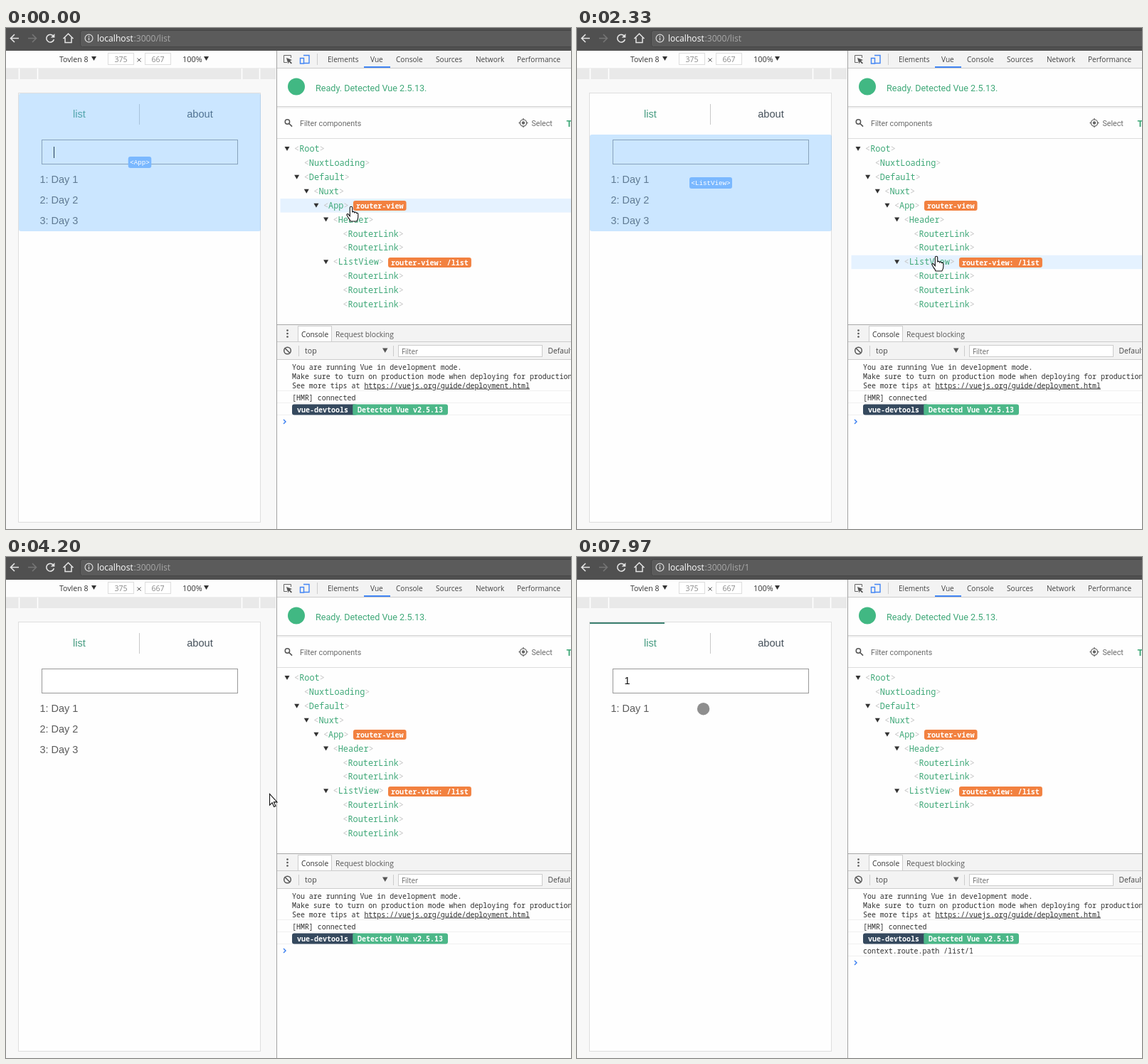
An HTML page that plays this animation: 794x705 px, repeating every 8 s.

```html
<!DOCTYPE html>
<html lang="en">
<head>
<meta charset="utf-8">
<title>Component inspector</title>
<style>
  html, body { margin: 0; width: 100%; height: 100%; overflow: hidden; background: #fff; }
  svg { display: block; }
  text { white-space: pre; }
  .ui { font-family: "Open Sans", "Noto Sans", sans-serif; }
  .panel { font-family: Roboto, sans-serif; }
  .page { font-family: "Liberation Sans", Arial, sans-serif; }
  .code { font-family: "Noto Sans Mono", "DejaVu Sans Mono", monospace; }
  .tag { font-family: "Liberation Mono", monospace; }
</style>
</head>
<body>
<svg width="794" height="705" viewBox="0 0 794 705">
  <g id="base"></g>
  <g id="live"></g>
</svg>
<script>
const LOOP = 8000, TICK = 78;
const GREEN = '#3fa878';

const rect = (x, y, w, h, fill, more = '') =>
  `<rect x="${x}" y="${y}" width="${w}" height="${h}" fill="${fill}" ${more}/>`;
const text = (x, y, str, cls, size, fill, more = '') =>
  `<text x="${x}" y="${y}" class="${cls}" font-size="${size}" fill="${fill}" ${more}>${str}</text>`;
const line = (d, stroke, width = 1, more = '') =>
  `<path d="${d}" fill="none" stroke="${stroke}" stroke-width="${width}" ${more}/>`;
const shape = (d, fill, more = '') => `<path d="${d}" fill="${fill}" ${more}/>`;
const circle = (x, y, r, fill, more = '') => `<circle cx="${x}" cy="${y}" r="${r}" fill="${fill}" ${more}/>`;
const down = (x, y, s = 7, fill = '#333') => shape(`M${x} ${y}h${s}l${-s / 2} ${s * .85}z`, fill);
const BOLD = 'font-weight="700"', MIDDLE = 'text-anchor="middle"';

function browserBar() {
  return rect(0, 0, 794, 32, '#505050') +
    rect(104.5, 3.5, 700, 23, '#5b5b5b', 'rx="3" stroke="#454545"') +
    line('M18 14.5H7M12 9l-5.5 5.5L12 20', '#e4e4e4', 1.6) +
    line('M31 14.5H42M37 9l5.5 5.5L37 20', '#757575', 1.6) +
    line('M66.4 11.2a5.4 5.4 0 1 0 1 4.8', '#e4e4e4', 1.6) + shape('M68.4 8v5.6h-5.6z', '#e4e4e4') +
    line('M80.5 15L87.5 8L94.5 15M83 13.5V20.5H92V13.5', '#e4e4e4', 1.5) +
    circle(116.5, 14.5, 5.4, 'none', 'stroke="#ddd" stroke-width="1.2"') +
    line('M116.5 13.5v4M116.5 11v1.4', '#ddd', 1.3) +
    text(128, 19, 'localhost', 'ui', 12.1, '#fff');
}

function devicePane() {
  return rect(0, 32, 380, 25, '#fdfdfd') + rect(0, 57, 380, 648, '#f8f8f8') +
    rect(0, 57, 379, 15, '#e9e9e9') + line('M0 56.5H380', '#eee') +
    line('M18.5 57V72M44.5 57V72M331.5 57V72M356.5 57V72', '#fff', 1.6) +
    text(75, 48, 'Tovlen 8', 'ui', 10.6, '#333') + down(120, 40) +
    rect(143.5, 35.5, 36, 16, '#fff', 'stroke="#ddd"') + rect(195.5, 35.5, 36, 16, '#fff', 'stroke="#ddd"') +
    text(161.5, 47.5, '375', 'ui', 10.6, '#888', MIDDLE) + text(213.5, 47.5, '667', 'ui', 10.6, '#888', MIDDLE) +
    line('M184.5 42.5l5 5m0-5l-5 5', '#555') +
    text(248, 48, '100%', 'ui', 10.9, '#333') + down(278, 40) +
    rect(17.5, 91.5, 340, 604, '#fefefe', 'stroke="#dedede"') +
    text(103, 126, 'list', 'page', 14.6, '#459b80', MIDDLE) +
    text(272.5, 126, 'about', 'page', 14.6, '#45505a', MIDDLE) +
    line('M187.5 107V136', '#c8c8c8') +
    rect(50.5, 157.5, 275, 34, '#fff', 'stroke="#999"');
}

function toolsPane() {
  const tabs = [[452, 'Elements'], [512, 'Vue'], [548, 'Console'], [604, 'Sources'], [660, 'Network'], [718, 'Performance']];
  return rect(380, 32, 414, 673, '#fefefe') + rect(380, 32, 414, 24, '#f3f3f3') + line('M381 56.5H794', '#ccc') +
    line('M395 48.5h-4.5v-10h10v3.5', '#666') + shape('M394 42l8 3-3 1.3 3 3-1.3 1.2-3-3-1.2 3z', '#555') +
    line('M418 38.5h8v11h-8M413.5 42.5h5v7.5h-5z', '#4285f4', 1.4) + line('M437.5 36V52', '#ccc') +
    tabs.map(([x, name]) => text(x, 48, name, 'ui', 10.1, '#444')).join('') +
    rect(503, 54, 37, 2, '#4285f4') +
    circle(408, 82.5, 12, '#41b883') +
    text(435, 89, 'Ready. Detected Vue 2.5.13.', 'panel', 12.6, GREEN) +
    rect(381, 110, 413, 1, '#d3d3d3') + rect(381, 111, 413, 2, '#f0f0f0') +
    circle(395.4, 132, 3.2, 'none', 'stroke="#555" stroke-width="1.5"') + line('M397.8 134.5l4.2 4.2', '#555', 1.7) +
    text(413, 137.5, 'Filter components', 'panel', 10.7, '#6b6b6b') +
    circle(727, 133.5, 4.6, 'none', 'stroke="#666" stroke-width="1.3"') + circle(727, 133.5, 2.2, '#666') +
    line('M720.5 133.5h2M731.5 133.5h2M727 127v2M727 138v2', '#666', 1.3) +
    text(738.5, 137.5, 'Select', 'panel', 10.7, '#6b6b6b') +
    text(787.5, 138.5, 'T', 'panel', 13, GREEN, BOLD) +
    line('M381 155.5H794', '#ddd');
}

function consolePane() {
  const mono = (y, str) => text(402, y, str, 'code', 9.95, '#303030');
  return rect(380, 417, 414, 49, '#f3f3f3') + line('M381 417.5H794', '#a8a8a8') + line('M381 441.5H794M381 466.5H794', '#ccc') +
    [425.5, 430, 434.5].map(y => circle(395.5, y, 1.3, '#555')).join('') +
    rect(410.5, 419.5, 47, 22, '#fff', 'stroke="#ccc"') +
    text(415, 435, 'Console', 'ui', 10.2, '#333') + text(463, 435, 'Request blocking', 'ui', 10.3, '#555') +
    circle(395.5, 454, 4.8, 'none', 'stroke="#555" stroke-width="1.5"') + line('M392 450.5l7 7', '#555', 1.5) +
    line('M411.5 447V462M544.5 447V462', '#ccc') +
    text(420, 458, 'top', 'ui', 10.6, '#444') + down(529, 450.5, 7.5, '#555') +
    rect(551.5, 446.5, 202, 16, '#fff', 'stroke="#ccc"') + text(556, 458.5, 'Filter', 'ui', 9.9, '#666') +
    text(761.5, 458, 'Default levels', 'ui', 10.3, '#444') +
    mono(481, 'You are running Vue in development mode.') +
    mono(493.5, 'Make sure to turn on production mode when deploying for production.') +
    mono(506.5, 'See more tips at <tspan text-decoration="underline">https://vuejs.org/guide/deployment.html</tspan>') +
    mono(523.5, '[HMR] connected') +
    line('M381 510.5H794M381 527.5H794M381 544.5H794', '#f0f0f0') +
    rect(402, 529.5, 90, 15, '#35495e', 'rx="3"') + rect(487.5, 529.5, 133.5, 15, '#4cb788', 'rx="3"') + rect(487.5, 529.5, 5, 15, '#4cb788') +
    text(409, 540.7, 'vue-devtools', 'code', 10, '#fff', BOLD) +
    text(494, 540.7, 'Detected Vue v2.5.13', 'code', 10, '#fff', BOLD) +
    line('M380.5 32V705', '#a3a3a3');
}

// Component tree: name, depth, has children, badge, inspector overlay [x, y, w, h, label]
const links = i => ['RouterLink', 5, 0, '', [47, 200 + 28.6 * i, 281, 28.6, 'router-link']];
const tree = [
  ['Root', 0, 1], ['NuxtLoading', 1, 0], ['Default', 1, 1], ['Nuxt', 2, 1],
  ['App', 3, 1, 'router-view', [18, 92, 340, 194, 'App']],
  ['Header', 4, 1, '', [18, 92, 340, 58, 'Header']],
  ['RouterLink', 5, 0, '', [18, 107, 170, 28.6, 'router-link']],
  ['RouterLink', 5, 0, '', [188, 107, 170, 28.6, 'router-link']],
  ['ListView', 4, 1, 'router-view: /list', [18, 150, 340, 136, 'ListView']],
  links(0), links(1), links(2)
];
const ROW = 19.92, TOP = 170;

function treeRow([name, depth, open, badge], i) {
  const x = 405 + 13.65 * depth, y = TOP + ROW * i;
  const badgeX = Math.round(x + 7.14 * (name.length + 2) + 5.9), badgeY = Math.round(y - 6.8);
  const bracket = c => `<tspan fill="#c4c4c4">${c}</tspan>`;
  return (open ? down(x - 13.5, y - 3) : '') +
    text(x, y + 4, bracket('&lt;') + name + bracket('&gt;'), 'code', 11.9, GREEN) +
    (badge ? rect(badgeX, badgeY, badge.length * 6.05 + 8, 14, '#f28140', 'rx="3"') +
      text(badgeX + 4, badgeY + 10.7, badge, 'code', 10.08, '#fff', BOLD) : '');
}

function overlay([x, y, w, h, label]) {
  const cx = x + w / 2, cy = y + h / 2, lw = (label.length + 2) * 5.5 + 5;
  return rect(x, y, w, h, '#68b6ff', 'rx="3" opacity=".34"') +
    rect(cx - lw / 2, cy - 8, lw, 16, '#7ab8ff', 'rx="3"') +
    text(cx, cy + 3.3, `&lt;${label}&gt;`, 'tag', 9.17, '#fff', MIDDLE);
}

// Pointer stops: time, x, y
const stops = [
  [912, 485, 251], [1380, 491, 271], [1458, 491, 271], [1692, 497, 285], [2316, 505, 321], [2340, 505, 321],
  [3174, 510, 382], [3252, 510, 385], [3720, 510, 385], [4188, 370, 333], [4578, 242, 265],
  [4656, 231, 228], [4812, 220, 196], [6762, 220, 196], [7152, 177.6, 213.7]
];
function pointerAt(t) {
  const i = stops.findIndex(s => s[0] > t);
  if (i === 0) return stops[0].slice(1);
  if (i < 0) return stops[stops.length - 1].slice(1);
  const [t0, x0, y0] = stops[i - 1], [t1, x1, y1] = stops[i], k = (t - t0) / (t1 - t0);
  return [x0 + (x1 - x0) * k, y0 + (y1 - y0) * k];
}

const HAND = 'M-1.7 2a1.7 1.7 0 0 1 3.4 0V8.2a1.6 1.6 0 0 1 3 .6a1.6 1.6 0 0 1 2.9 .8a1.4 1.4 0 0 1 2.2 1.2V15q0 3-2 6H-1q-1-3-3-5l-2.2-4q.3-2 2-1.2l2.5 3z';
const ARROW = 'M.5 .5V16.2l3.6-3.5 2.6 5.8 2.3-1-2.6-5.6H11z';
function pointer(x, y) {
  if (x < 358) return circle(x, y, 8.7, '#6c6c6c', 'opacity=".77"');
  return shape(x > 385 ? HAND : ARROW, '#fff', `stroke="#111" stroke-width="1.1" transform="translate(${x} ${y})"`);
}

const blinks = [150, 700, 1190, 1690, 2170, 2660, 3150, 3670, 4130, 4610, 5090, 5560, 6570, 7060, 7580];

function scene(t) {
  const stepped = 990 + TICK * Math.floor((t - 990) / TICK + .05);
  const [x, y] = pointerAt(stepped);
  const typed = t >= 6020, visited = t >= 7660, logged = t >= 7740;
  const row = x > 385 ? Math.round((y - TOP) / ROW) : -1;
  const caretOn = blinks.filter(b => b <= t).length % 2 === 0;
  const progress = Math.min(105, Math.max(0, (stepped - 7620) / 312 * 105));
  const promptY = logged ? 571 : 554;

  let out = text(179.5, 19, ':3000/list' + (visited ? '/1' : ''), 'ui', 12.1, '#a9a9a9');
  for (let day = 1; day <= (typed ? 1 : 3); day++)
    out += text(47.4, 189.2 + 28.8 * day, `${day}: Day ${day}`, 'page', 14.5, '#5c5c5c');
  if (typed) out += text(66.5, 179, '1', 'page', 14.5, '#111');
  if (caretOn) out += rect(typed ? 75 : 67, 167, 1, 16, '#000');
  if (progress) out += rect(18, 92, progress, 2, '#3b8070');
  if (row >= 0) out += rect(385.5, TOP + ROW * row - 9.6, 408.5, 19.5, '#e5f2ff');
  out += tree.slice(0, t >= 6090 ? 10 : 12).map(treeRow).join('');
  if (row >= 0) out += overlay(tree[row][4]);
  if (logged) out += text(402, 557.5, 'context.route.path /list/1', 'code', 9.95, '#303030') + line('M381 561.5H794', '#f0f0f0');
  out += line(`M390 ${promptY - 3}l3 3-3 3`, '#367cf1', 1.4);
  return out + pointer(x, y);
}

document.getElementById('base').innerHTML = browserBar() + devicePane() + toolsPane() + consolePane();
const live = document.getElementById('live');
const start = performance.now();
let shown = '';
function draw() {
  const next = scene((performance.now() - start) % LOOP);
  if (next !== shown) live.innerHTML = shown = next;
  requestAnimationFrame(draw);
}
draw();
</script>
</body>
</html>
```
